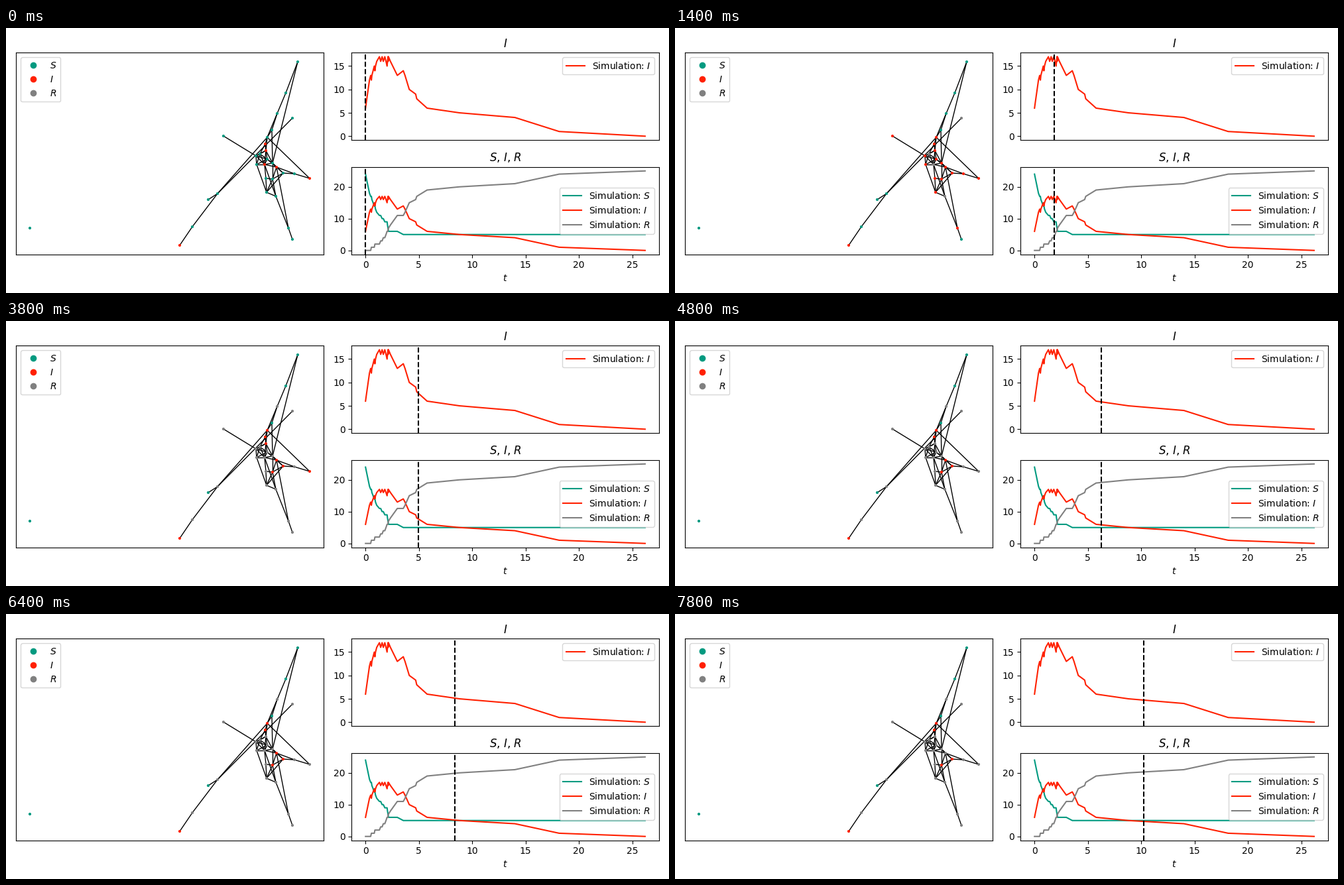
Write a matplotlib script that moves like this. It is 1000x400 px and loops after 8000 ms.

```python
import numpy as np
import matplotlib.pyplot as plt
from matplotlib.animation import FuncAnimation
from matplotlib.collections import LineCollection

plt.rcParams["font.family"] = "DejaVu Sans"

W, H, DPI = 1000, 400, 100
FRAMES, INTERVAL = 40, 200
T_END = 26.2
STEP = T_END / 100
KINDS = "SIR"
COLORS = np.array(["#009a80", "#ff2000", "gray"])

# Node positions in pixels from the top left, in order of infection:
# six ill at the start, nineteen infected later, five never infected.
SEEDS, CASES = 6, 25
NODES = np.array([
    (390, 206), (392, 185), (458, 227), (408, 210), (391, 175), (262, 328),
    (432, 136), (383, 190), (407, 254), (377, 193), (378, 206), (394, 198),
    (393, 248), (426, 302), (402, 204), (435, 220), (392, 227), (394, 165),
    (418, 219), (402, 228), (328, 163), (319, 250), (432, 319), (281, 300),
    (409, 129),
    (440, 51), (422, 98), (401, 154), (305, 259), (36, 302),
])
NODES[:, 1] = H - NODES[:, 1]

# Close nodes are linked; these paths add the long links.
REACH = 22
PATHS = [(25, 26, 24, 17), (24, 27, 14, 19, 8, 13, 22), (25, 14), (3, 13),
         (17, 2, 15, 3), (17, 21, 23, 5), (21, 6), (20, 9), (10, 12, 18),
         (0, 8)]


def find_links():
    gaps = np.linalg.norm(NODES[:, None] - NODES, axis=2)
    links = set(zip(*np.nonzero(np.triu(gaps < REACH, 1))))
    for path in PATHS:
        links |= {tuple(sorted(pair)) for pair in zip(path, path[1:])}
    return sorted(links)


def spread(count, *keys):
    """Times of events 1..count, evenly spaced between (number, time) keys."""
    return np.interp(np.arange(1, count + 1), *zip(*keys))


infected = np.full(len(NODES), np.inf)
infected[:SEEDS] = 0
infected[SEEDS:CASES] = spread(
    CASES - SEEDS, (1, .06), (6, .37), (12, 1.05), (16, 2.06), (18, 2.15),
    (19, 3.54))

recovered = np.full(len(NODES), np.inf)
recovery_order = np.r_[0, 6:14, 20:22, 14:17, 22, 24, 23, 1:4, 17:20, 4:6]
recovered[recovery_order] = spread(
    CASES, (1, .55), (2, .88), (3, 1.42), (5, 1.92), (7, 2.12), (11, 2.98),
    (12, 3.7), (15, 4.1), (16, 4.7), (17, 4.8), (19, 5.77), (20, 8.8),
    (21, 14), (24, 18.15), (25, T_END))


def states(t):
    """0, 1 or 2 per node: susceptible, infected, recovered."""
    return (t >= infected).astype(int) + (t >= recovered)


times = np.unique(np.r_[infected[:CASES], recovered[:CASES]])
counts = np.array([np.bincount(states(t), minlength=3) for t in times])


def series_plot(ax, kinds, legend_loc):
    for kind in kinds:
        i = KINDS.index(kind)
        ax.plot(times, counts[:, i], color=COLORS[i],
                label=f"Simulation: ${kind}$")
    ax.set_title(", ".join(f"${kind}$" for kind in kinds))
    ax.legend(loc=legend_loc)
    return ax.axvline(0, color="k", linestyle="--")


fig = plt.figure(figsize=(W / DPI, H / DPI), dpi=DPI, facecolor="white")
net, upper, lower = (fig.add_subplot(spot) for spot in (121, 222, 224))

for kind, color in zip(KINDS, COLORS):
    net.plot([], [], "o", color=color, label=f"${kind}$")
net.legend(loc="upper left")
net.set(xticks=[], yticks=[])

cursors = [series_plot(upper, "I", "upper right"),
           series_plot(lower, "SIR", "center right")]
upper.set(xticks=[], yticks=range(0, 16, 5))
lower.set(xticks=range(0, 26, 5), yticks=range(0, 21, 10), xlabel="$t$")
for ax in (upper, lower):
    ax.set_xlim(-0.05 * T_END, 1.05 * T_END)
fig.tight_layout()

# One data unit of the network panel is one pixel.
box = net.get_window_extent()
net.set(xlim=(box.x0, box.x1), ylim=(box.y0, box.y1))
net.add_collection(LineCollection([NODES[list(link)] for link in find_links()],
                                  colors="k", linewidths=1, zorder=1),
                   autolim=False)
dots = net.scatter(*NODES.T, s=4, c=COLORS[states(0)], linewidths=1, zorder=2)
net.set(xlim=(box.x0, box.x1), ylim=(box.y0, box.y1))


def update(frame):
    t = frame * STEP
    dots.set_color(COLORS[states(t)])
    for line in cursors:
        line.set_xdata([t, t])
    return [dots, *cursors]


anim = FuncAnimation(fig, update, frames=FRAMES, interval=INTERVAL,
                     repeat=True, repeat_delay=0)
plt.show()
```
